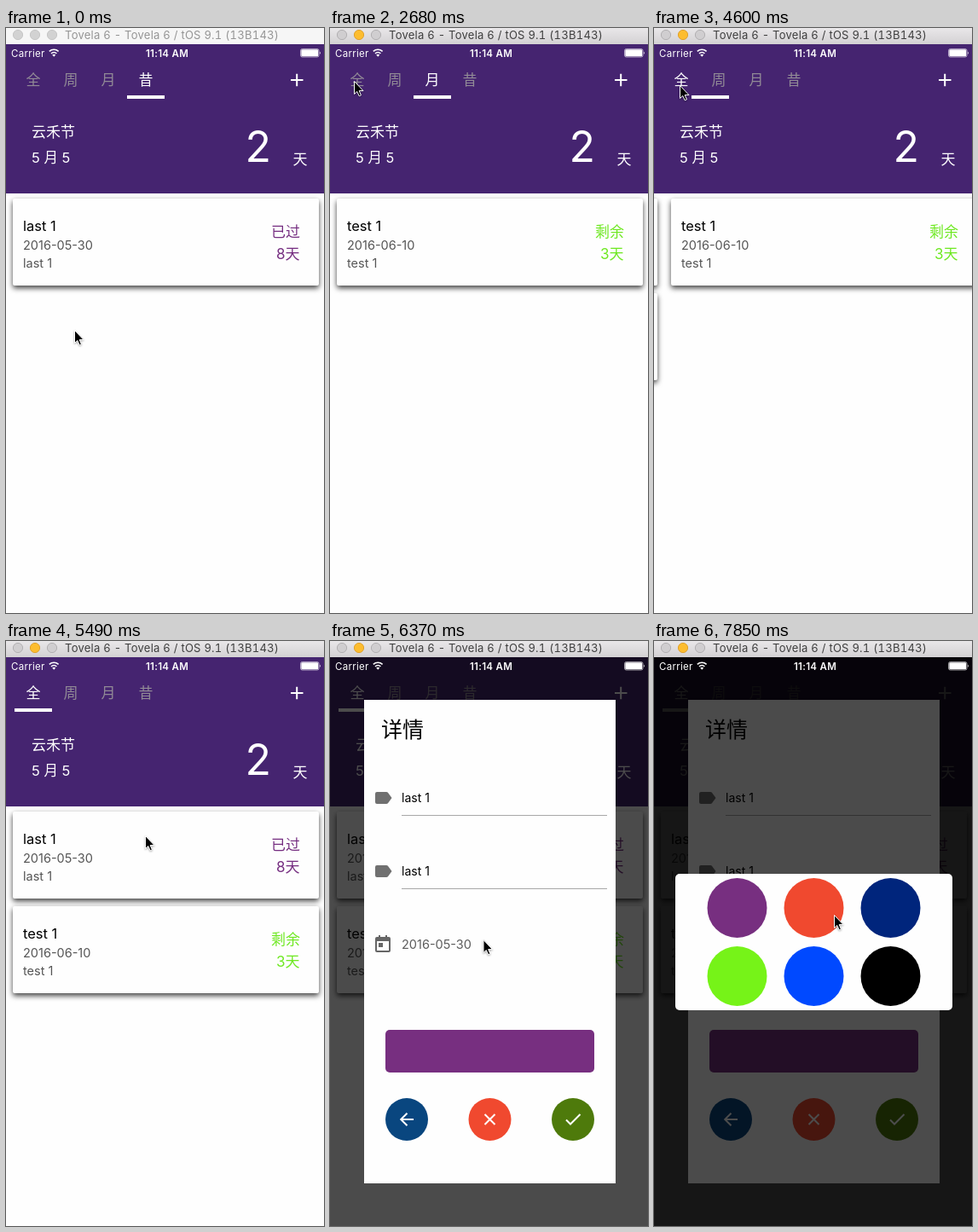
An HTML page for the animation above (7.99 s loop, 373 by 686 pixels).

```html
<!DOCTYPE html>
<html lang="zh-CN">
<head>
<meta charset="utf-8">
<title>Countdown days</title>
<style>
  html, body { margin: 0; width: 100%; height: 100%; overflow: hidden; background: #fefefe; }
  svg { display: block; width: 373px; height: 686px; }
  text { font-family: Inter, "Noto Sans CJK SC", "Noto Sans CJK", sans-serif; white-space: pre; }
  .card rect { fill: #fefefe; filter: drop-shadow(0 3px 3px rgba(0, 0, 0, .75)); }
  .tab { font-size: 17px; fill: #918a96; text-anchor: middle; }
  .tab.on { fill: #fff; }
  .end { text-anchor: end; }
  .line { fill: none; stroke: #fff; stroke-width: 2; }
  #title { fill: #f6f6f6; }
  #title text { fill: #959595; font-size: 13px; letter-spacing: .25px; font-feature-settings: "tnum"; }
  #title circle { fill: #d2d2d2; stroke: #c6c6c6; }
  #title.on { fill: url(#bar); }
  #title.on text { fill: #3f3f3f; }
  #title.on circle { fill: #d0ced0; stroke: #b2b0b2; }
  #title.on .amber { fill: #fdbd2f; stroke: #e0a12c; }
</style>
</head>
<body>
<svg viewBox="0 0 373 686">
  <defs>
    <linearGradient id="bar" x2="0" y2="1">
      <stop stop-color="#e9e7e9"/><stop offset="1" stop-color="#d3d1d3"/>
    </linearGradient>
  </defs>

  <rect width="373" height="686" fill="#fefefe"/>
  <g id="pages"></g>

  <g id="header" fill="#fff">
    <rect y="19" width="373" height="175" fill="#452470"/>
    <g id="tabs"></g>
    <rect id="mark" y="79" width="44" height="4"/>
    <path class="line" d="M334 61h14.500M341.200 53.800v14.500"/>
    <text x="30" y="128" font-size="17">云禾节</text>
    <text x="30" y="158" font-size="16.500">5 月 5</text>
    <text x="280.500" y="156.500" font-size="50">2</text>
    <text x="336.500" y="160" font-size="17">天</text>
  </g>

  <g id="detail">
    <rect y="19" width="373" height="667" opacity=".7"/>
    <rect x="40" y="69" width="295" height="567" fill="#fefefe"/>
    <text x="60" y="113" font-size="25">详情</text>
    <g id="fields"></g>
    <path fill="#666" fill-rule="evenodd" d="M55 347h2v-2h2v2h6v-2h2v2h2q2 0 2 2v14q0 2-2 2H55q-2 0-2-2v-14q0-2 2-2zM55 352v11h14v-11zM57 354h5v5h-5z"/>
    <text x="84" y="361" font-size="14.500" fill="#5c5c5c">2016-05-30</text>
    <rect x="65" y="456" width="245" height="50" rx="5" fill="#772f80"/>
    <circle cx="90" cy="561" r="25" fill="#09467f"/>
    <circle cx="187.500" cy="561" r="25" fill="#f0492f"/>
    <circle cx="285" cy="561" r="25" fill="#4e7a0b"/>
    <path class="line" d="M98 561H83.500M90.500 553.700L83.200 561l7.300 7.300M181.500 555l12 12m0-12l-12 12M277 561.500l5 5 11.500-11.500"/>
  </g>

  <g id="picker">
    <rect y="19" width="373" height="667" opacity=".7"/>
    <rect x="25" y="273" width="325" height="160" rx="5" fill="#fefefe"/>
    <g id="swatches"></g>
  </g>

  <g fill="#fff" font-size="11.500" letter-spacing=".3">
    <text x="6" y="33.500">Carrier</text>
    <text x="189" y="33.500" font-weight="600" text-anchor="middle">11:14 AM</text>
    <path class="line" d="M50.800 27.300a8 8 0 0 1 10.800 0M53 29.800a5 5 0 0 1 6.400 0" style="stroke-width:1.600"/>
    <path d="M56.200 33.800l-2-2.200a3 3 0 0 1 4 0z"/>
    <rect x="345.500" y="24.500" width="21.500" height="9.500" rx="2" fill="none" stroke="#fff" stroke-width=".6"/>
    <rect x="346.300" y="25.300" width="19.900" height="7.900" rx="1.200"/>
    <path d="M368 27.500q1.700 1.700 0 3.500z"/>
  </g>

  <g id="title">
    <rect width="373" height="19"/>
    <circle cx="14" cy="8" r="5.600"/>
    <circle class="amber" cx="34" cy="8" r="5.600"/>
    <circle cx="54" cy="8" r="5.600"/>
    <text x="69" y="13">Tovela 6 - Tovela 6 / tOS 9.1 (13B143)</text>
  </g>

  <path id="cursor" d="M.5-.5V14.500L3.800 11.500 6.200 16.800 8.400 15.800 6.200 10.600H11Z" stroke="#fff"
    style="filter:drop-shadow(0 1px 1px rgba(0,0,0,.35))"/>
</svg>

<script>
const $ = id => document.getElementById(id);
const LOOP = 7990, TICK = 148.1, PAGE = 375;

const last = ['last 1', '2016-05-30', '已过', '8天', '#752d80'];
const test = ['test 1', '2016-06-10', '剩余', '3天', '#6ee821'];

const card = ([name, date, state, days, color], x, y) => `
  <g class="card" transform="translate(${x} ${y})">
    <rect x="8" width="359" height="102" rx="2"/>
    <text x="20" y="38" font-size="16.500">${name}</text>
    <g font-size="14.500" fill="#555"><text x="20" y="60">${date}</text><text x="20" y="81">${name}</text></g>
    <g font-size="17" fill="${color}" class="end"><text x="345" y="45">${state}</text><text x="344.500" y="71">${days}</text></g>
  </g>`;

$('pages').innerHTML = [[last, test], [test], [test], [last]]
  .map((list, i) => list.map((c, j) => card(c, i * PAGE, 200 + j * 111)).join('')).join('');

$('tabs').innerHTML = [...'全周月昔']
  .map((c, i) => `<text class="tab" x="${32 + 44 * i}" y="67">${c}</text>`).join('');
const tabs = [...$('tabs').children];

$('fields').innerHTML = [0, 86].map(y => `
  <g transform="translate(0 ${y})">
    <path fill="#707070" d="M55 177h11q1.500 0 2.300 1.200L72.500 184l-4.200 5.800Q67.500 191 66 191H55q-2 0-2-2v-10q0-2 2-2z"/>
    <text x="84" y="188.500" font-size="14">last 1</text>
    <rect x="84" y="204" width="241" height="1" fill="#a8a8a8"/>
  </g>`).join('');

$('swatches').innerHTML = ['#772f80', '#f0492f', '#00257c', '#76f318', '#0049ff', '#000']
  .map((c, i) => `<circle cx="${97.5 + 90 * (i % 3)}" cy="${313 + 80 * (i / 3 | 0)}" r="35" fill="${c}"/>`).join('');

// Pointer path: tick, x, y
const path = [
  [1, 80, 355], [4, 80, 256], [8, 80, 256], [9, 60, 97], [10, 58, 80], [12, 103, 64],
  [16, 103, 64], [18, 28, 63], [21, 85, 64], [23, 51, 65], [24, 68, 64], [26, 68, 64],
  [29, 30, 68], [33, 30, 68], [37, 163, 229], [41, 163, 229], [45, 196, 473],
  [49, 196, 473], [53, 211, 322]
];
const taps = [14, 26, 31];
const OPEN_DETAIL = 39, OPEN_PICKER = 47;

const clamp = v => Math.min(1, Math.max(0, v));
const smooth = v => (v = clamp(v), v * v * (3 - 2 * v));
const move = (id, x, y) => $(id).setAttribute('transform', `translate(${x} ${y})`);

function pointer(n) {
  const i = path.findIndex(k => k[0] >= n);
  if (i < 1) return path[i < 0 ? path.length - 1 : 0].slice(1);
  const [a, b] = [path[i - 1], path[i]], p = (n - a[0]) / (b[0] - a[0]);
  return [1, 2].map(k => a[k] + (b[k] - a[k]) * p);
}

// Pages scrolled through so far; each tap goes one page to the left
const scrolled = (n, lead) =>
  taps.reduce((sum, t) => sum + (n < t ? 0 : smooth(((n - t) * TICK + lead) / 300)), 0);

function slideIn(id, n, start, from) {
  $(id).style.display = n < start ? 'none' : '';
  move(id, 0, Math.round(from * Math.max(0, .836 - .451 * (n - start)) ** 3));
}

function draw(n) {
  $('title').classList.toggle('on', n >= taps[0]);

  const current = 3 - taps.filter(t => n >= t).length;
  tabs.forEach((t, i) => t.classList.toggle('on', i === current));
  move('pages', Math.round((scrolled(n, 32) - 3) * PAGE), 0);
  // The tab mark runs ahead of the pages
  move('mark', Math.round(10 + 44 * (3 - scrolled(n, 93))), 0);

  slideIn('detail', n, OPEN_DETAIL, 667);
  slideIn('picker', n, OPEN_PICKER, -667);
  move('cursor', ...pointer(n));
}

// The screen refreshes at a low, fixed rate
function frame() {
  draw(Math.floor((performance.now() % LOOP + 4) / TICK));
  requestAnimationFrame(frame);
}
frame();
</script>
</body>
</html>
```
